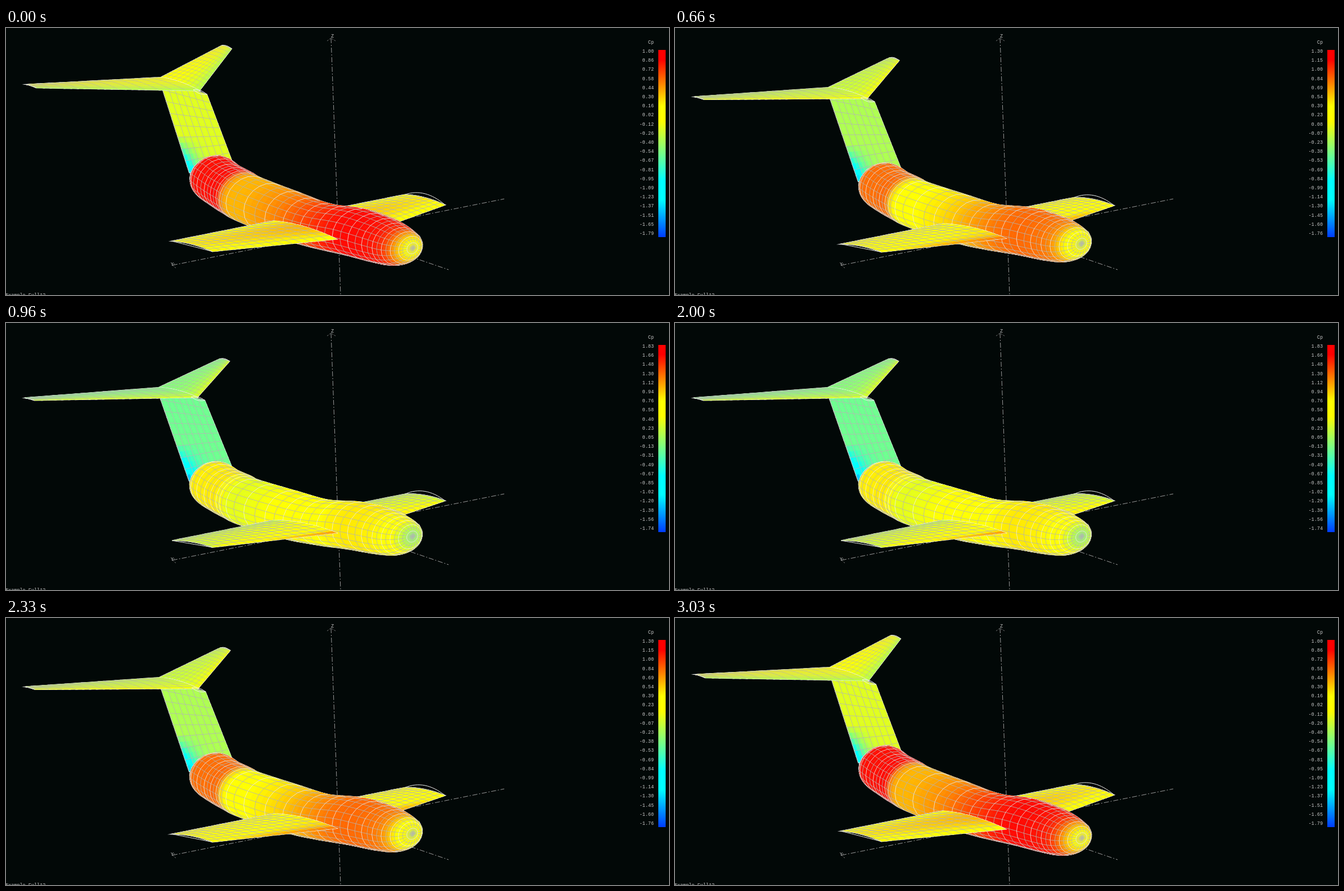
Recreate the animation shown at these times as an HTML page with a canvas. Size 1179x475 px, loop 3.36 s.

```html
<!DOCTYPE html>
<html lang="en">
<head>
<meta charset="utf-8">
<style>
  html, body { margin: 0; width: 100%; height: 100%; overflow: hidden; background: #020807; }
  canvas { display: block; }
</style>
</head>
<body>
<canvas id="stage" width="1179" height="475"></canvas>
<script>
const ctx = document.getElementById('stage').getContext('2d');
const WHITE = '#eee', GREY = '#b4b4b4';
const mix = (a, b, t) => a + (b - a) * t;
const clamp = x => Math.min(1, Math.max(0, x));
const steps = n => Array.from({ length: n + 1 }, (_, i) => i / n);

// Cp scale limits for each of the five pitch steps
const HIGH = [.9993, 1, 1.3026, 1.8337, 2.3672];
const LOW = [-1.7907, -1.773, -1.7554, -1.7387, -1.7228];
const CHANGES = [330, 660, 960, 1330, 2000, 2330, 2700, 3030];
const LOOP = 3360;

// Hull stations: distance forward, centre height, radius, Cp
const HULL = [
  [-248, 16, 14, .8], [-225, 21, 37, .82], [-200, 13, 39, .82], [-178, 8, 40, .8],
  [-160, 4, 40, .38], [-90, 0, 41, .46], [-30, 1, 39, .66], [30, 10, 41, .82],
  [80, 12, 39, .82], [109, 12, 33, .72], [128, 15, 21, .3], [133, 17, 0, -.05]
];
const WING = { back: -88.5, backSweep: 0, front: 30, frontSweep: .228, root: 27, tip: 207, backH: -5, frontH: 1 };
const TAIL = { back: -316, backSweep: .372, front: -247, frontSweep: .671, root: 0, tip: 173.5, backH: 167, frontH: 167 };

let range, pitch;

function ramp(f) {
  const r = clamp((f - .3) / .32), b = clamp((.62 - f) / .32);
  const g = f < .5 ? clamp(.24 + 3.8 * f) : clamp((.95 - f) / .25);
  return `rgb(${[r, g, b].map(c => Math.round(c * 255))})`;
}
const cpColor = cp => ramp((cp - range[1]) / (range[0] - range[1]));

// Parallel projection of (forward, sideways, up), pitched about the wing axis
function place(f, s, h) {
  const x = f - .03 * pitch * h, up = h + .119 * pitch * f;
  return [591 + x - s, 363 + .342 * x + .2 * s - up];
}

function path(points) {
  ctx.beginPath();
  points.forEach(p => ctx.lineTo(...p));
}

function line(points, color = WHITE, width = 1) {
  path(points);
  ctx.strokeStyle = color;
  ctx.lineWidth = width;
  ctx.stroke();
}

function cells(point, nu, nv, solid, visit) {
  for (let i = 0; i < nu; i++) for (let j = 0; j < nv; j++) {
    const u = i / nu, v = j / nv, u2 = (i + 1) / nu, v2 = (j + 1) / nv;
    const quad = [point(u, v), point(u2, v), point(u2, v2), point(u, v2)];
    const [a, b, c, d] = quad;
    const facing = (c[0] - a[0]) * (d[1] - b[1]) - (c[1] - a[1]) * (d[0] - b[0]);
    if (!solid || facing < 0) visit(quad, (u + u2) / 2, (v + v2) / 2, i);
  }
}

function mesh(point, nu, nv, cp, { solid = false, ringColor = () => GREY, width = .8 } = {}) {
  // A slightly larger white shape underneath leaves a thin outline
  cells(point, nu * 2, nv * 2, solid, quad => {
    path(quad);
    ctx.closePath();
    ctx.strokeStyle = WHITE;
    ctx.lineWidth = 1.8;
    ctx.stroke();
  });
  cells(point, nu * 2, nv * 2, solid, (quad, u, v) => {
    path(quad);
    ctx.closePath();
    ctx.fillStyle = ctx.strokeStyle = cpColor(cp(u, v));
    ctx.lineWidth = .6;
    ctx.fill();
    ctx.stroke();
  });
  cells(point, nu, nv, solid, ([a, b, , d], u, v, i) => {
    line([a, b], GREY, width);
    line([a, d], ringColor(i), width);
  });
}

function lifting(shape, side, nu, nv, cp, width) {
  const point = (u, v, camber = .05) => {
    const s = mix(shape.tip, shape.root, u);
    const back = shape.back - shape.backSweep * s, front = shape.front - shape.frontSweep * s;
    const bulge = camber * (front - back) * 4 * v * (1 - v);
    return place(mix(back, front, v), side * s, mix(shape.backH, shape.frontH, v) + bulge);
  };
  mesh(point, nu, nv, cp, { width });
  line(steps(16).map(v => point(0, v, .075 * (1 - side))));
}

const wingCp = (u, v) => .1 + .27 * Math.sin(Math.PI * v) * (.4 + .6 * u)
  + pitch * (.1 + 1.45 * v ** 6 * Math.sqrt(u));
const tailCp = (u, v) => -.07 + v ** 3 * (-.25 + .85 * pitch);
const finCp = (u, v) => -.17 - 1.3 * Math.max(0, (u - .6) / .4) * (1 - v) ** 4;

function finPoint(u, v) {
  const f = mix(mix(-319, -265, u), mix(-234, -189, u), v);
  return place(f, 0, mix(mix(165, 15, u), mix(165, 61, u), v));
}

// Smooth curve through the hull stations
function station(u) {
  const n = HULL.length - 1, i = Math.min(n - 1, Math.floor(u * n)), t = u * n - i;
  const [a, b, c, d] = [-1, 0, 1, 2].map(k => HULL[Math.min(n, Math.max(0, i + k))]);
  return b.map((p, k) => p + t / 2 * (c[k] - a[k]
    + t * (2 * a[k] - 5 * p + 4 * c[k] - d[k] + t * (3 * (p - c[k]) + d[k] - a[k]))));
}

function hullPoint(u, v) {
  const [f, centre, r] = station(u), a = 2 * Math.PI * v;
  return place(f, r * Math.cos(a), centre + r * Math.sin(a));
}

function drawFinTip() {
  [-3, 3].forEach(bulge => line(steps(8).map(t =>
    place(mix(-258, -234, t), 0, 165 + bulge * 4 * t * (1 - t)))));
}

function drawAxes() {
  ctx.setLineDash([9, 3, 2, 3]);
  line([[578, 18], [595, 475]], '#999');
  line([[296, 422], [886, 304]], '#999');
  line([[591, 363], [787, 430]], '#999');
  ctx.setLineDash([3, 2]);
  line([[571, 23], [578, 18], [586, 23]], '#777');
  line([[302, 427], [296, 422], [301, 418]], '#777');
  ctx.setLineDash([]);
}

function drawText() {
  ctx.font = '8.5px "Liberation Mono", monospace';
  ctx.fillStyle = '#c8c8c8';
  ctx.textAlign = 'left';
  ctx.fillText('Z', 578, 17);
  ctx.fillText('Y', 293, 423);
  ctx.fillText('Example_Full12', -1, 478);
  ctx.textAlign = 'right';
  ctx.fillText('Cp', 1152, 28);
  steps(20).forEach(t => ctx.fillText(mix(...range, t).toFixed(2), 1152, 44 + t * 324));
}

function drawScale() {
  for (let y = 39; y < 372; y++) {
    ctx.fillStyle = ramp(1 - (y - 39) / 332);
    ctx.fillRect(1160, y, 13, 1);
  }
}

function draw(step) {
  range = [HIGH[step], LOW[step]];
  pitch = step / 4;
  ctx.fillStyle = '#020807';
  ctx.fillRect(0, 0, 1179, 475);
  drawAxes();
  lifting(WING, -1, 14, 8, wingCp);
  mesh(finPoint, 8, 7, finCp);
  mesh(hullPoint, 44, 20, u => station(u)[3], { solid: true, ringColor: i => i % 2 ? GREY : WHITE });
  lifting(WING, 1, 14, 8, wingCp);
  lifting(TAIL, -1, 12, 8, tailCp, .6);
  lifting(TAIL, 1, 12, 8, tailCp, .6);
  drawFinTip();
  drawText();
  drawScale();
}

const start = performance.now();
let shown = -1;
function tick() {
  const time = (performance.now() - start) % LOOP;
  const passed = CHANGES.filter(t => t <= time).length;
  const step = 4 - Math.abs(passed - 4);
  if (step !== shown) draw(shown = step);
  requestAnimationFrame(tick);
}
tick();
</script>
</body>
</html>
```
